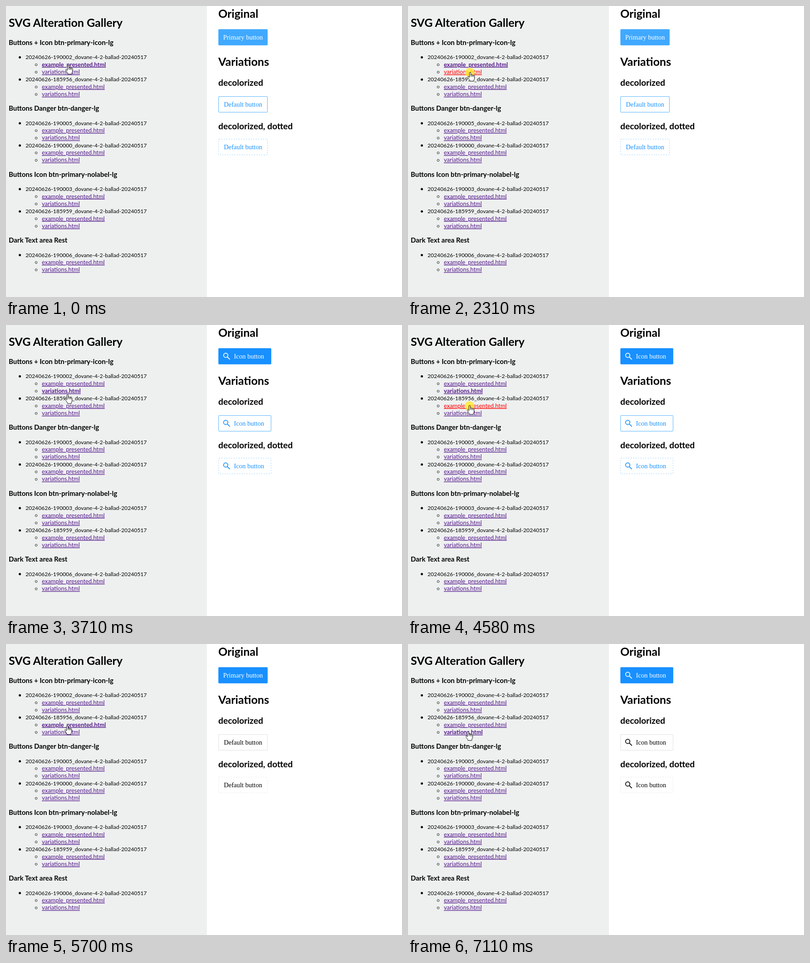
These frames come from a looping animation (873x642 px, 8 s). An HTML page:

```html
<!DOCTYPE html>
<html lang="en">
<head>
<meta charset="utf-8">
<title>Button variations</title>
<style>
html, body { margin: 0; width: 100%; height: 100%; overflow: hidden; background: #fff; }
svg { display: block; width: 873px; height: 642px; font-family: Lato, sans-serif; }
.h1 { font-size: 25px; font-weight: 700; }
.h2 { font-size: 19.2px; font-weight: 700; }
.h3 { font-size: 15px; font-weight: 700; }
.run { font-size: 12.15px; }
.link { font-size: 12.95px; fill: #551a8b; text-decoration: underline; }
.label { font: 14.54px "Liberation Serif", serif; }

/* every change is a hard cut */
.link[id], .view, #heads, #pointer, #spot { animation: 8s step-end infinite; }
#link0 { animation-name: link0; }
#link1 { animation-name: link1; }
#link2 { animation-name: link2; }
#link3 { animation-name: link3; }
#viewA { animation-name: viewA; }
#viewB { animation-name: viewB; }
#viewC { animation-name: viewC; }
#viewD { animation-name: viewD; }
#heads { animation-name: heads; }
#spot { animation-name: spot; }
#pointer { animation-name: pointer; }

@keyframes link0 {
  0% { font-weight: 700; }
  30.5%, 100% { font-weight: 400; }
}
@keyframes link1 {
  0% { fill: #551a8b; font-weight: 400; }
  28.875% { fill: #f00; font-weight: 400; }
  30.5% { fill: #551a8b; font-weight: 700; }
  58%, 100% { fill: #551a8b; font-weight: 400; }
}
@keyframes link2 {
  0% { fill: #551a8b; font-weight: 400; }
  57.25% { fill: #f00; font-weight: 400; }
  58% { fill: #551a8b; font-weight: 700; }
  88.125%, 100% { fill: #551a8b; font-weight: 400; }
}
@keyframes link3 {
  0% { fill: #551a8b; font-weight: 400; }
  87.125% { fill: #f00; font-weight: 400; }
  88.125%, 100% { fill: #551a8b; font-weight: 700; }
}
@keyframes viewA { 0% { opacity: 1; } 30.5%, 100% { opacity: 0; } }
@keyframes viewB { 0% { opacity: 0; } 30.5% { opacity: 1; } 58%, 100% { opacity: 0; } }
@keyframes viewC { 0% { opacity: 0; } 58.875% { opacity: 1; } 88.125%, 100% { opacity: 0; } }
@keyframes viewD { 0% { opacity: 0; } 88.875%, 100% { opacity: 1; } }
@keyframes heads {
  0%, 58.875%, 88.875%, 100% { opacity: 1; }
  58%, 88.125% { opacity: 0; }
}
@keyframes spot {
  0%, 30.5%, 58%, 88.125%, 100% { opacity: 0; }
  28.875%, 57.25%, 87.125% { opacity: .8; }
}
@keyframes pointer {
  0% { transform: translate(137px, 130.5px); }
  16.5% { transform: translate(136px, 138px); }
  17.25% { transform: translate(135px, 147px); }
  18% { transform: translate(134px, 152.5px); }
  21.375% { transform: translate(134px, 151px); }
  22.25% { transform: translate(135px, 149px); }
  23% { transform: translate(136px, 147px); }
  23.875% { transform: translate(137px, 146px); }
  46.375% { transform: translate(136px, 153.5px); }
  47.25% { transform: translate(136px, 161px); }
  48.125% { transform: translate(136px, 168px); }
  48.875% { transform: translate(136px, 173px); }
  49.75% { transform: translate(136px, 176px); }
  50.5% { transform: translate(136px, 177.5px); }
  71.25% { transform: translate(135px, 180px); }
  72.125% { transform: translate(134px, 184px); }
  73% { transform: translate(133px, 188px); }
  73.75% { transform: translate(132px, 191px); }
  74.625% { transform: translate(131px, 193px); }
  75.375% { transform: translate(131px, 194px); }
  77.875%, 100% { transform: translate(132.5px, 193px); }
}
</style>
</head>
<body>
<svg viewBox="0 0 873 642">
  <rect width="443" height="642" fill="#eef0f0"/>
  <text class="h1" x="6" y="45.5">SVG Alteration Gallery</text>
  <g id="list"></g>
  <g id="heads">
    <text class="h1" x="468" y="25.5">Original</text>
    <text class="h1" x="468" y="132">Variations</text>
    <text class="h2" x="468" y="176">decolorized</text>
    <text class="h2" x="468" y="271.5">decolorized, dotted</text>
  </g>
  <g id="views"></g>
  <g id="pointer">
    <circle id="spot" cx="-.5" cy="1" r="10.5" fill="#ffeb2e"/>
    <path fill="#fff" stroke="#000" stroke-linejoin="round" d="M-1.6 11.5V1.8a1.6 1.6 0 0 1 3.2 0V6.5a1.4 1.2 0 0 1 2.8 .4a1.4 1.2 0 0 1 2.7 .6a1.4 1.3 0 0 1 2.6 1.2V13c0 2.5-1.7 3.5-1.7 6.8H-.3c0-2.2-2.2-4-3.4-6.3-.8-1.6-1.8-2.6-1.6-3.6.4-1.2 2-1 3.7 1.6Z"/>
    <path fill="none" stroke="#000" stroke-width=".9" d="M1.6 6.5V10M4.4 7V10.3M7.1 7.6V10.6"/>
  </g>
</svg>
<script>
const ROW = 16.35, GROUP = 145.4;
const MODEL = "dovane-4-2-ballad-20240517";
const groups = [
  ["Buttons + Icon btn-primary-icon-lg", "190002", "185956"],
  ["Buttons Danger btn-danger-lg", "190005", "190000"],
  ["Buttons Icon btn-primary-nolabel-lg", "190003", "185959"],
  ["Dark Text area Rest", "190006"]
];

const text = (cls, x, y, str, extra = "") =>
  `<text class="${cls}" x="${x}" y="${y.toFixed(1)}" ${extra}>${str}</text>`;

let links = 0;
function link(y, str) {
  const id = links < 4 ? `id="link${links}"` : "";
  links++;
  return `<circle cx="66.5" cy="${y - 4}" r="2.3" fill="none" stroke="#222"/>` +
    text("link", 79, y, str, id);
}

function run(y, time) {
  return `<circle cx="30.5" cy="${y - 4}" r="2.5"/>` +
    text("run", 43, y, `20240626-${time}_${MODEL}`) +
    link(y + ROW, "example_presented.html") +
    link(y + 2 * ROW, "variations.html");
}

document.getElementById("list").innerHTML = groups.map(([title, ...times], i) => {
  const top = i * GROUP;
  return text("h3", 6, 86 + top, title) +
    times.map((t, j) => run(117.3 + top + j * 3 * ROW, t)).join("");
}).join("");

function button(y, label, icon, ink, box) {
  const w = icon ? 117 : 109;
  const content = icon
    ? `<g fill="none" stroke="${ink}" stroke-width="1.7">
         <circle cx="484.4" cy="${y + 15.9}" r="4.7"/>
         <path d="M487.8 ${y + 19.3}l5.8 5.8"/>
       </g>` + text("label", 502.5, y + 22.6, label, `fill="${ink}"`)
    : text("label", 522.5, y + 22.6, label, `fill="${ink}" text-anchor="middle"`);
  return `<rect x="468.7" y="${y + .7}" width="${w - 1.4}" height="34.6" rx="1" stroke-width=".91" ${box}/>` + content;
}

function view(id, icon, fill, ink, border, dots) {
  const name = icon ? "Icon button" : "Default button";
  const main = icon ? name : "Primary button";
  return `<g class="view" id="view${id}">` +
    button(51, main, icon, "#fff", `fill="${fill}" stroke="${fill}"`) +
    button(199, name, icon, ink, `fill="#fff" stroke="${border}"`) +
    button(293, name, icon, ink, `fill="#fff" stroke="${dots}" stroke-dasharray="1.8 3.6"`) +
    "</g>";
}

document.getElementById("views").innerHTML =
  view("A", false, "#40a9ff", "#1890ff", "#40a9ff", "#70bcfa") +
  view("B", true, "#1890ff", "#1890ff", "#40a9ff", "#70bcfa") +
  view("C", false, "#1890ff", "#000", "#dcdcdc", "#d9d9d9") +
  view("D", true, "#1890ff", "#000", "#dcdcdc", "#d9d9d9");
</script>
</body>
</html>
```
